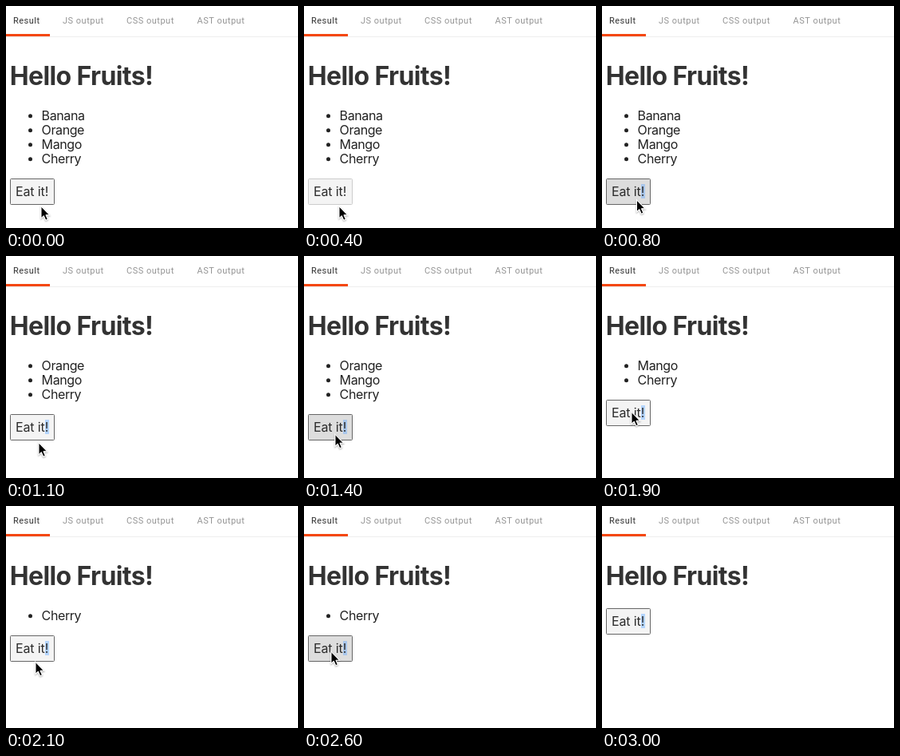
These frames come from a looping animation (366 px wide and 278 px high, 3.3 s). An HTML page with a canvas:

```html
<!DOCTYPE html>
<html lang="en">
<head>
<meta charset="utf-8">
<style>
  html, body { margin: 0; width: 100%; height: 100%; overflow: hidden; background: #fff; }
  canvas { display: block; }
</style>
</head>
<body>
<canvas width="366" height="278"></canvas>
<script>
const ctx = document.querySelector('canvas').getContext('2d');
const LOOP = 3300;
const ROW = 18;
const FRUITS = ['Banana', 'Orange', 'Mango', 'Cherry'];
const TABS = [['Result', 9], ['JS output', 71], ['CSS output', 151], ['AST output', 239.5]];

const start = { eaten: 0, pressed: false, focused: true, selected: false, cursor: [44, 251] };

// Each step overrides part of the state from its time onwards.
const steps = [
  [400, { focused: false }],
  [600, { selected: true, cursor: [44, 247] }],
  [700, { cursor: [43.5, 243] }],
  [800, { pressed: true, focused: true }],
  [1000, { pressed: false, eaten: 1 }],
  [1100, { cursor: [41, 234] }],
  [1200, { cursor: [39, 226] }],
  [1300, { cursor: [39, 223.5] }],
  [1400, { pressed: true }],
  [1500, { pressed: false, eaten: 2 }],
  [1700, { cursor: [38, 210] }],
  [1800, { cursor: [37, 198] }],
  [1900, { cursor: [37, 195.5] }],
  [2000, { pressed: true }],
  [2100, { pressed: false, eaten: 3 }],
  [2400, { cursor: [35, 188] }],
  [2500, { cursor: [34, 182.5] }],
  [2600, { pressed: true }],
  [2700, { pressed: false, eaten: 4 }],
  [2800, { cursor: [90, 212] }],
  [2900, { cursor: [182, 254] }],
  [3000, { cursor: null }]
];

function stateAt(time) {
  const passed = steps.filter(([at]) => at <= time).map(([, change]) => change);
  return Object.assign({}, start, ...passed);
}

function rect(x, y, w, h, color) {
  ctx.fillStyle = color;
  ctx.fillRect(x, y, w, h);
}

function text(value, x, y, font, color, spacing) {
  ctx.font = font;
  ctx.letterSpacing = spacing + 'px';
  ctx.fillStyle = color;
  ctx.fillText(value, x, y);
}

function drawHeader() {
  rect(0, 38, 366, 1, '#eee');
  rect(0, 35, 55, 3, '#f4470f');
  TABS.forEach(([label, x], i) =>
    text(label, x, 22, '11px Roboto, sans-serif', i ? '#949494' : '#333', 0.5));
  text('Hello Fruits!', 4.8, 99, 'bold 32px Inter, sans-serif', '#333', -0.63);
}

function drawList(fruits) {
  fruits.forEach((fruit, i) => {
    const y = 143 + i * ROW;
    ctx.fillStyle = '#222';
    ctx.beginPath();
    ctx.arc(30.5, y - 5.3, 2.5, 0, 2 * Math.PI);
    ctx.fill();
    text(fruit, 44.6, y, '16px Inter, sans-serif', '#222', -0.4);
  });
}

function drawButton(y, { pressed, focused, selected }) {
  ctx.beginPath();
  ctx.roundRect(5.5, y + 0.5, 55, 32, 1);
  ctx.fillStyle = pressed ? '#ddd' : '#f4f4f4';
  ctx.fill();
  ctx.strokeStyle = focused ? '#666' : '#ccc';
  ctx.lineWidth = 1;
  ctx.stroke();
  if (selected) rect(49, y + 7, 5, 18, pressed ? '#a9c7ec' : '#b4d5fe');
  text('Eat it!', 12, y + 22, '16px Inter, sans-serif', '#2b2b2b', -0.12);
}

function drawCursor([x, y]) {
  const arrow = new Path2D('M0 0V14.6L3.3 11.6L5.8 17.2L8.3 16.1L5.9 10.7H10.4Z');
  ctx.save();
  ctx.translate(x, y);
  ctx.shadowColor = 'rgba(0, 0, 0, .35)';
  ctx.shadowBlur = 2;
  ctx.shadowOffsetY = 1;
  ctx.strokeStyle = '#fff';
  ctx.lineWidth = 1.4;
  ctx.stroke(arrow);
  ctx.shadowColor = 'transparent';
  ctx.fillStyle = '#000';
  ctx.fill(arrow);
  ctx.lineWidth = 1;
  ctx.stroke(arrow);
  ctx.restore();
}

function draw(now) {
  const state = stateAt(now % LOOP);
  const fruits = FRUITS.slice(state.eaten);
  rect(0, 0, 366, 278, '#fff');
  drawHeader();
  drawList(fruits);
  drawButton(fruits.length ? 144 + fruits.length * ROW : 128, state);
  if (state.cursor) drawCursor(state.cursor);
}

const began = performance.now();
function tick() {
  draw(performance.now() - began);
  requestAnimationFrame(tick);
}
tick();
</script>
</body>
</html>
```
